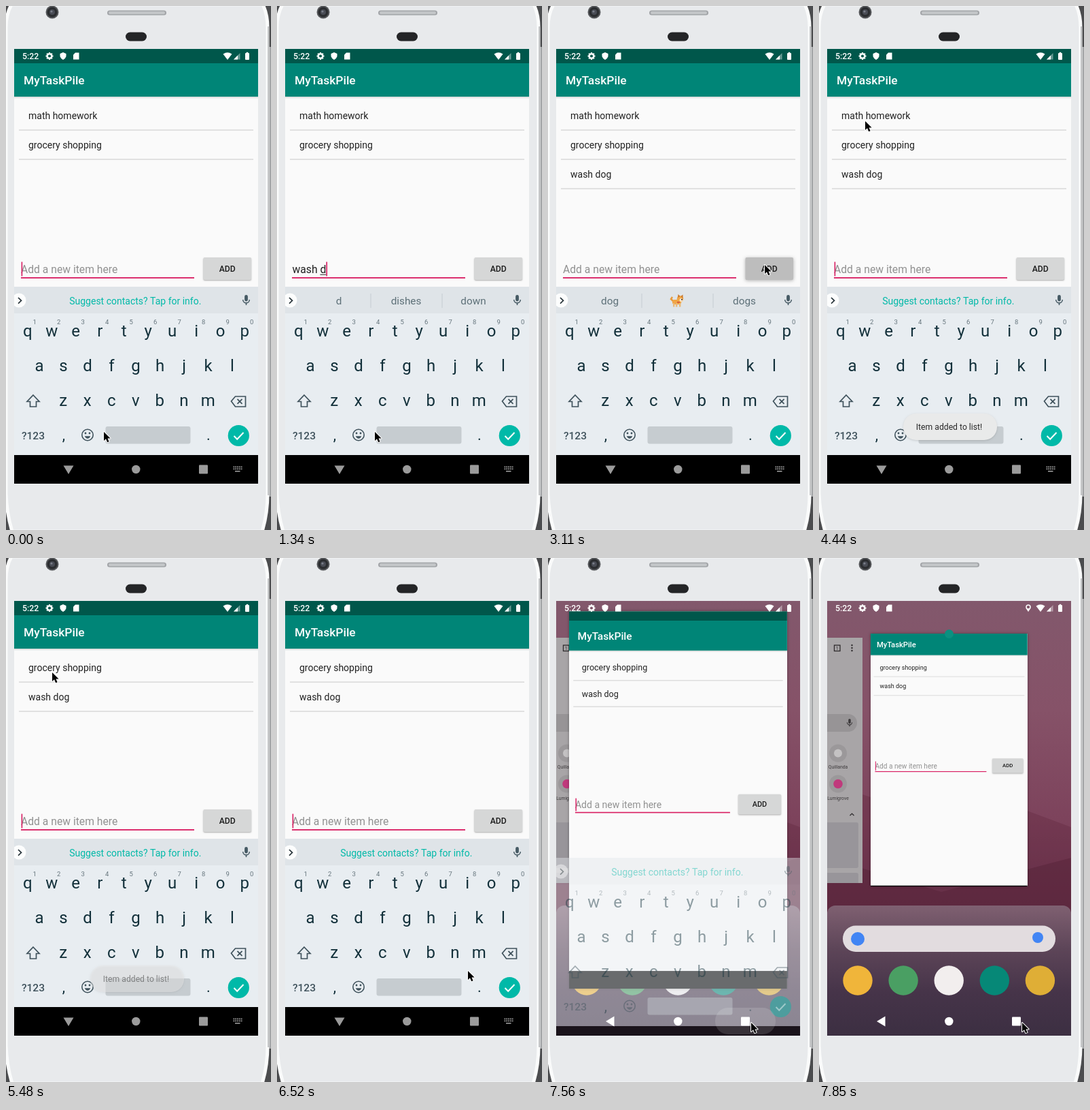
Write an HTML page with a canvas that moves like this. It is 390 px wide and 769 px high and loops after 8 s.

```html
<!DOCTYPE html>
<html lang="en">
<head>
<meta charset="utf-8">
<title>To-do list demo</title>
<style>
  html, body { margin: 0; width: 100%; height: 100%; overflow: hidden; background: #e8eaec; }
  canvas { display: block; width: 390px; height: 769px; }
</style>
</head>
<body>
<canvas id="stage"></canvas>
<script>
const canvas = document.getElementById('stage');
const c = canvas.getContext('2d');
const dpr = window.devicePixelRatio || 1;
canvas.width = 390 * dpr;
canvas.height = 769 * dpr;

const LOOP = 8000, STEP = 148.2;
const TITLE = 'MyTaskPile';
const INK = '#12303a', GREY = '#5d7078', TEAL = '#00b9a8', PINK = '#d81b60';

// ---------- helpers ----------
function rect(x, y, w, h, fill) {
  c.fillStyle = fill;
  c.fillRect(x, y, w, h);
}
function round(x, y, w, h, r, fill) {
  c.beginPath();
  c.roundRect(x, y, w, h, r);
  c.fillStyle = fill;
  c.fill();
}
function disc(x, y, r, fill) {
  c.beginPath();
  c.arc(x, y, r, 0, Math.PI * 2);
  c.fillStyle = fill;
  c.fill();
}
function ring(x, y, r, color, width) {
  c.beginPath();
  c.arc(x, y, r, 0, Math.PI * 2);
  c.strokeStyle = color;
  c.lineWidth = width;
  c.stroke();
}
function trace(pts, close) {
  c.beginPath();
  for (let i = 0; i < pts.length; i += 2) c.lineTo(pts[i], pts[i + 1]);
  if (close) c.closePath();
}
function poly(pts, fill) {
  trace(pts, true);
  c.fillStyle = fill;
  c.fill();
}
function line(pts, color, width, close) {
  trace(pts, close);
  c.strokeStyle = color;
  c.lineWidth = width;
  c.stroke();
}
function text(s, x, y, size, color, align = 'left', weight = 400) {
  c.font = `${weight} ${size}px Roboto, sans-serif`;
  c.textAlign = align;
  c.fillStyle = color;
  c.fillText(s, x, y);
  return c.measureText(s).width;
}
function linear(y0, y1, ...stops) {
  const g = c.createLinearGradient(0, y0, 0, y1);
  stops.forEach((s, i) => g.addColorStop(i / (stops.length - 1), s));
  return g;
}
// Value at step k from rows [k, ...values], linear in between.
function along(rows, k) {
  if (k <= rows[0][0]) return rows[0].slice(1);
  for (let i = 1; i < rows.length; i++) {
    const a = rows[i - 1], b = rows[i];
    if (k <= b[0]) {
      const f = (k - a[0]) / (b[0] - a[0]);
      return a.slice(1).map((v, j) => v + (b[j + 1] - v) * f);
    }
  }
  return rows[rows.length - 1].slice(1);
}
// Last entry whose step has been reached.
const latest = (rows, k) => rows.filter(r => r[0] <= k).pop();

// ---------- timeline ----------
const typed = [[0, ''], [1, 'w'], [2, 'wa'], [3, 'was'], [4, 'wash'], [5, 'wash '],
  [9, 'wash d'], [12, 'wash do'], [13, 'wash dog'], [21, '']];
const hints = [[0], [1, 'w', 'with', 'W'], [2, 'wa', 'was', 'W'], [3, 'was', 'wash', 'W'],
  [4, 'wash', 'was', 'W'], [5, 'the', 'my', 'it'], [9, 'd', 'dishes', 'down'],
  [12, 'do', 'dog', 'down'], [13, 'dog', '', 'dogs'], [23]];
const mouse = [[13, 144, 625], [14, 162, 612], [15, 218, 570], [16, 278, 500], [17, 335, 420],
  [18, 350, 388], [19, 322, 379], [20, 319, 380], [22, 319, 380], [23, 300, 366], [24, 245, 325],
  [25, 180, 288], [26, 134, 258], [27, 105, 215], [28, 80, 185], [29, 70, 172], [30, 68, 169],
  [32, 67, 165], [34, 68, 168], [40, 68, 168], [41, 85, 205], [42, 140, 330], [43, 225, 500],
  [44, 281, 606], [45, 296, 655], [46, 299, 685], [47, 299, 693], [48, 299, 684], [49, 299, 682]];
const toastAlpha = [[22, 0], [24, 1], [36, 1], [38, 0]];
const shrink = [[49, 0], [50, 0.06], [51, 0.297], [52, 0.78], [53, 1]];
const boardMove = [[49, 0, 1], [50, 5, 0.85], [51, 28, 0.45], [52, 40, 0.1], [53, 45, 0]];

function itemsAt(k) {
  const list = ['math homework', 'grocery shopping'];
  if (k >= 21) list.push('wash dog');
  return k >= 36 ? list.slice(1) : list;
}
function caretOn(k) {
  if (k < 21 || k >= 49) return true;
  return Math.floor((k * STEP - 8 - 3110) / 500) % 2 === 0;
}

// ---------- phone ----------
function phone() {
  rect(0, 0, 390, 769, '#4b4c4e');
  rect(387, 60, 3, 660, '#a3a5a7');
  c.beginPath();
  c.moveTo(8, -2);
  c.quadraticCurveTo(0, 12, 0, 32);
  c.lineTo(0, 715);
  c.quadraticCurveTo(1, 745, 9, 771);
  c.lineTo(377, 771);
  c.quadraticCurveTo(385, 745, 385, 715);
  c.lineTo(385, 32);
  c.quadraticCurveTo(385, 12, 378, -2);
  c.closePath();
  c.fillStyle = '#e8eaec';
  c.fill();
  c.strokeStyle = '#fafbfb';
  c.lineWidth = 5;
  c.stroke();
  line([386, 30, 386, 718], '#8b8d90', 1);
  disc(68, 9, 9.5, '#55575a');
  disc(68, 9, 7.5, '#2b2d30');
  disc(68, 9, 4, '#494c55');
  disc(67, 8, 1.6, '#7b7f8a');
  round(149, 6.5, 87, 7, 3.5, '#a2a5a8');
  round(151, 8, 83, 4, 2, '#c3c6c8');
  round(176, 38.5, 31, 13, 6.5, '#242527');
}

function statusIcons(pin) {
  const w = '#fff';
  text('5:22', 24, 78, 12.3, w, 'left', 500);
  ring(64, 73.5, 3.3, w, 2.4);
  for (let i = 0; i < 8; i++) {
    const a = i * Math.PI / 4, x = Math.cos(a), y = Math.sin(a);
    line([64 + x * 3.5, 73.5 + y * 3.5, 64 + x * 5.5, 73.5 + y * 5.5], w, 2);
  }
  poly([84, 68, 88.5, 70, 88.5, 74, 86.8, 77, 84, 79, 81.2, 77, 79.5, 74, 79.5, 70], w);
  poly([102, 68.5, 107.5, 68.5, 107.5, 78.5, 99, 78.5, 99, 71.5], w);
  c.beginPath();
  c.moveTo(326, 79);
  c.lineTo(319.5, 70.5);
  c.quadraticCurveTo(326, 65.8, 332.5, 70.5);
  c.fillStyle = w;
  c.fill();
  poly([335, 78.5, 344.5, 69, 344.5, 78.5], 'rgba(255,255,255,.4)');
  poly([335, 78.5, 341, 72.5, 341, 78.5], w);
  round(352, 69, 6, 10, 1, w);
  rect(353.7, 67.8, 2.6, 2, w);
  if (pin) {
    ring(308, 72, 3, w, 1.5);
    poly([304.8, 74, 311.2, 74, 308, 79], w);
  }
}

// ---------- app ----------
function appWindow(k) {
  rect(12, 63, 359, 21, '#00574b');
  rect(12, 84, 359, 575, '#fafafa');
  rect(12, 133, 359, 3, linear(133, 136, 'rgba(0,0,0,.16)', 'rgba(0,0,0,0)'));
  rect(12, 84, 359, 49, '#008577');
  rect(12, 659, 359, 42, '#000');
  text(TITLE, 26, 115, 17.4, '#fff', 'left', 500);

  if (k === 35) rect(19, 140, 345, 41, '#d9d9d9');
  itemsAt(k).forEach((s, i) => {
    text(s, 33, 166 + i * 43, 14, '#212121');
    rect(19, 181.3 + i * 43, 345, 1.6, '#dcdcdc');
  });

  const s = latest(typed, k)[1];
  let caret = 22.6;
  if (s) {
    const w = text(s, 22.5, 392, 15.7, '#212121');
    const start = s.lastIndexOf(' ') + 1;
    const from = 22.5 + c.measureText(s.slice(0, start)).width;
    rect(from, 393.7, 22.5 + w - from, 1, '#212121');
    caret += w;
  } else {
    text('Add a new item here', 22, 392, 15.7, '#919191');
  }
  if (caretOn(k)) rect(caret, 375.5, 1.6, 21, PINK);
  rect(22, 398, 255, 1.8, PINK);

  const pressed = k >= 20 && k <= 21;
  c.save();
  c.shadowColor = 'rgba(0,0,0,.3)';
  c.shadowBlur = (pressed ? 5 : 2) * dpr;
  c.shadowOffsetY = dpr;
  round(290.5, 369, 70.5, 33, 2, pressed ? '#bdbdbd' : '#d6d7d7');
  c.restore();
  text('ADD', 325.7, 389.5, 12.2, '#1c1c1c', 'center', 500);
}

// ---------- keyboard ----------
function mic(x, y, color) {
  round(x - 2.4, y - 8, 4.8, 9.5, 2.4, color);
  c.beginPath();
  c.arc(x, y - 1, 4.8, 0, Math.PI);
  c.strokeStyle = color;
  c.lineWidth = 1.5;
  c.stroke();
  line([x, y + 3.5, x, y + 7], color, 1.6);
}
function puppy(x, y) {
  line([x - 6, y, x - 9, y - 3, x - 7, y - 6], '#e79a3c', 2.5);
  round(x - 7, y - 2, 13, 7, 3, '#f0a545');
  for (const d of [-6, -2, 3]) rect(x + d, y + 3, 2.4, 5.5, '#e8b878');
  disc(x + 4.5, y - 3, 4.8, '#f0a545');
  poly([x + 1, y - 5, x + 1.5, y - 10, x + 4.5, y - 7], '#c9772a');
  poly([x + 5.5, y - 7, x + 8.5, y - 9.5, x + 8.5, y - 4], '#c9772a');
  disc(x + 6, y - 1.5, 2.5, '#f8e6cc');
  disc(x + 7, y - 2.2, 1, '#3c2a20');
  rect(x, y + 1, 4, 1.5, '#d04636');
}
function strip(k) {
  rect(12, 412, 359, 39, '#dfe4e8');
  c.save();
  c.beginPath();
  c.rect(12, 412, 40, 39);
  c.clip();
  disc(19, 432, 10.5, '#fcfdfd');
  c.restore();
  line([18, 428, 22.5, 432.3, 18, 436.6], '#263238', 1.7);
  mic(353.5, 432, '#465a64');
  const words = latest(hints, k).slice(1);
  if (!words.length) {
    text('Suggest contacts? Tap for info.', 190.3, 437.5, 14, TEAL, 'center');
    return;
  }
  words.forEach((s, i) => text(s, 91 + i * 99, 438, 15.3, GREY, 'center'));
  if (!words[1]) puppy(190, 433);
  rect(137.5, 422, 1, 21, '#c5ccd1');
  rect(242.5, 422, 1, 21, '#c5ccd1');
}
function keyboard(k) {
  rect(12, 451, 359, 208, '#e8edf1');
  strip(k);
  const row = (keys, x, y) =>
    [...keys].forEach((s, i) => text(s, x + i * 35.5, y, 24, INK, 'center'));
  row('qwertyuiop', 31.7, 485);
  row('asdfghjkl', 49, 535.5);
  row('zxcvbnm', 84.3, 587);
  [...'1234567890'].forEach((s, i) => text(s, 42.2 + i * 35.5, 467, 9.5, '#66757d', 'center'));

  const ink = '#3f525c';
  line([40, 571, 49, 580.5, 44.5, 580.5, 44.5, 588, 35.5, 588, 35.5, 580.5, 31, 580.5], ink, 1.7, true);
  line([331.5, 580, 337.5, 573, 352.5, 573, 352.5, 588, 337.5, 588], ink, 1.7, true);
  line([340.5, 576.8, 347.5, 583.8], ink, 1.7);
  line([347.5, 576.8, 340.5, 583.8], ink, 1.7);
  text('?123', 40, 635.5, 15.5, ink, 'center', 500);
  text(',', 85, 637, 22, INK, 'center');
  text('.', 298, 637, 22, INK, 'center');
  ring(120, 629.5, 8.2, ink, 1.6);
  disc(117, 627, 1.4, ink);
  disc(123, 627, 1.4, ink);
  c.beginPath();
  c.arc(120, 630.5, 4.3, 0.2, Math.PI - 0.2);
  c.closePath();
  c.fillStyle = ink;
  c.fill();
  round(146.5, 617, 125, 25.5, 3, '#c6ccd0');
  disc(342.3, 630.5, 15.6, TEAL);
  line([335.5, 631, 340.2, 635.7, 349.5, 626], '#fff', 2);
}

function toast(alpha) {
  if (!alpha) return;
  c.save();
  c.globalAlpha = alpha;
  c.shadowColor = 'rgba(0,0,0,.14)';
  c.shadowBlur = 3 * dpr;
  c.shadowOffsetY = dpr;
  round(124, 598, 138, 39, 19, '#e9eaea');
  c.shadowColor = 'transparent';
  text('Item added to list!', 191.5, 621.7, 12.2, '#2a2a2a', 'center');
  c.restore();
}

function navIcons(open) {
  const color = open ? '#fff' : '#9b9b9b';
  if (open) poly([85, 680, 97.5, 672.5, 97.5, 687.5], color);
  else poly([84.5, 674.5, 99.5, 674.5, 92, 687], color);
  disc(191.3, 680, 6.2, color);
  round(284, 673.5, 13, 13, 1, color);
  if (open) return;
  for (let i = 0; i < 10; i++) rect(334.5 + (i % 5) * 2.8, 675.5 + (i > 4 ? 3 : 0), 1.8, 1.8, color);
  rect(337, 682, 7.5, 1.6, color);
}

// ---------- recents ----------
function sideCard() {
  rect(12, 117, 52, 360, '#a8a5a7');
  c.save();
  c.beginPath();
  c.rect(12, 117, 52, 360);
  c.clip();
  c.strokeStyle = '#2e2b2d';
  c.lineWidth = 1.3;
  c.strokeRect(22.5, 128, 8.5, 8.5);
  text('1', 26.8, 135, 7, '#2e2b2d', 'center');
  for (const y of [128, 132, 136]) disc(48.5, y, 1.2, '#2e2b2d');
  round(-10, 229, 66, 26, 13, '#979496');
  c.save();
  c.translate(45, 242);
  c.scale(0.75, 0.75);
  mic(0, 0, '#3d3a3c');
  c.restore();
  disc(28, 286.5, 13, '#9b989a');
  disc(28, 286.5, 6, '#c4c2c3');
  text('Quillanda', 28, 309, 6.8, '#3d3a3c', 'center');
  disc(28, 331.5, 13, '#9b989a');
  disc(28, 331.5, 6.8, '#c0397c');
  text('Lumigrove', 28, 354.5, 6.8, '#3d3a3c', 'center');
  line([45.5, 378, 48.5, 375, 51.5, 378], '#2e2b2d', 1.2);
  round(8, 388, 50, 67, 3, '#98959a');
  round(8, 462, 50, 20, 3, '#98959a');
  c.restore();
}
function home() {
  rect(12, 63, 359, 638, linear(63, 701, '#82586c', '#865268', '#7d435c', '#65304a', '#4c2a40'));
  poly([12, 330, 140, 372, 250, 350, 371, 395, 371, 520, 12, 520], 'rgba(96,38,62,.35)');
  poly([12, 440, 180, 490, 371, 440, 371, 520, 12, 520], 'rgba(80,30,52,.4)');
  sideCard();
  round(12, 510, 359, 191, [12, 12, 0, 0], linear(510, 701, '#7f6071', '#5d4558', '#463449', '#3c2f42'));
  round(35, 539.5, 313, 38.5, 19, '#e2dcdf');
  disc(57, 559, 10, '#4285f4');
  disc(322, 557, 8, '#4285f4');
  ['#f0b53a', '#4a9f63', '#f2eeee', '#068877', '#dfae36']
    .forEach((color, i) => disc(57 + i * 67.1, 620, 21.7, color));
}
function shrunkWindow(k, p) {
  const s = 1 - 0.357 * p, q = Math.pow(p, 0.95);
  const left = 12 + 64 * p, top = 63 + 48 * q;
  c.save();
  c.shadowColor = 'rgba(0,0,0,.35)';
  c.shadowBlur = 4 * dpr;
  rect(left, top, 359 * s, 701 - 219 * q - top, '#fafafa');
  c.restore();
  c.save();
  c.beginPath();
  c.rect(left, top, 359 * s, 701 - 219 * q - top);
  c.clip();
  c.translate(left, 84 + 27 * p);
  c.scale(s, s);
  c.translate(-12, -84);
  appWindow(k);
  c.restore();
  if (p === 1) disc(191.5, 111.5, 6.5, '#0b9080');
}
function recents(k) {
  const [p] = along(shrink, k), [dy, alpha] = along(boardMove, k);
  home();
  shrunkWindow(k, p);
  if (alpha) {
    c.save();
    c.beginPath();
    c.rect(12, 63, 359, 624);
    c.clip();
    c.globalAlpha = alpha;
    c.translate(0, dy);
    keyboard(k);
    c.restore();
  }
  if (k <= 51) {
    rect(12, 687, 359, 14, 'rgba(15,10,14,.75)');
    ripple();
  }
  statusIcons(p === 1);
  navIcons(true);
}
function ripple() {
  round(246, 660, 89, 39, 19, 'rgba(255,255,255,.13)');
}

function pointer(x, y) {
  const pts = [0, 0, 0, 13, 3, 10.3, 5.2, 15.2, 7.6, 14.2, 5.5, 9.4, 9.6, 9.4]
    .map((v, i) => v + (i % 2 ? y : x));
  c.lineJoin = 'round';
  line(pts, '#fff', 2, true);
  poly(pts, '#000');
  c.lineJoin = 'miter';
}

// ---------- loop ----------
function draw(t) {
  const k = Math.min(53, Math.floor((t + 8) / STEP));
  c.setTransform(dpr, 0, 0, dpr, 0, 0);
  phone();
  c.save();
  c.beginPath();
  c.rect(12, 63, 359, 638);
  c.clip();
  if (k >= 50) {
    recents(k);
  } else {
    appWindow(k);
    keyboard(k);
    toast(along(toastAlpha, k)[0]);
    statusIcons(false);
    if (k === 49) ripple();
    navIcons(false);
  }
  c.restore();
  pointer(...along(mouse, k));
}
const t0 = performance.now();
function tick() {
  draw((performance.now() - t0) % LOOP);
  requestAnimationFrame(tick);
}
tick();
</script>
</body>
</html>
```
